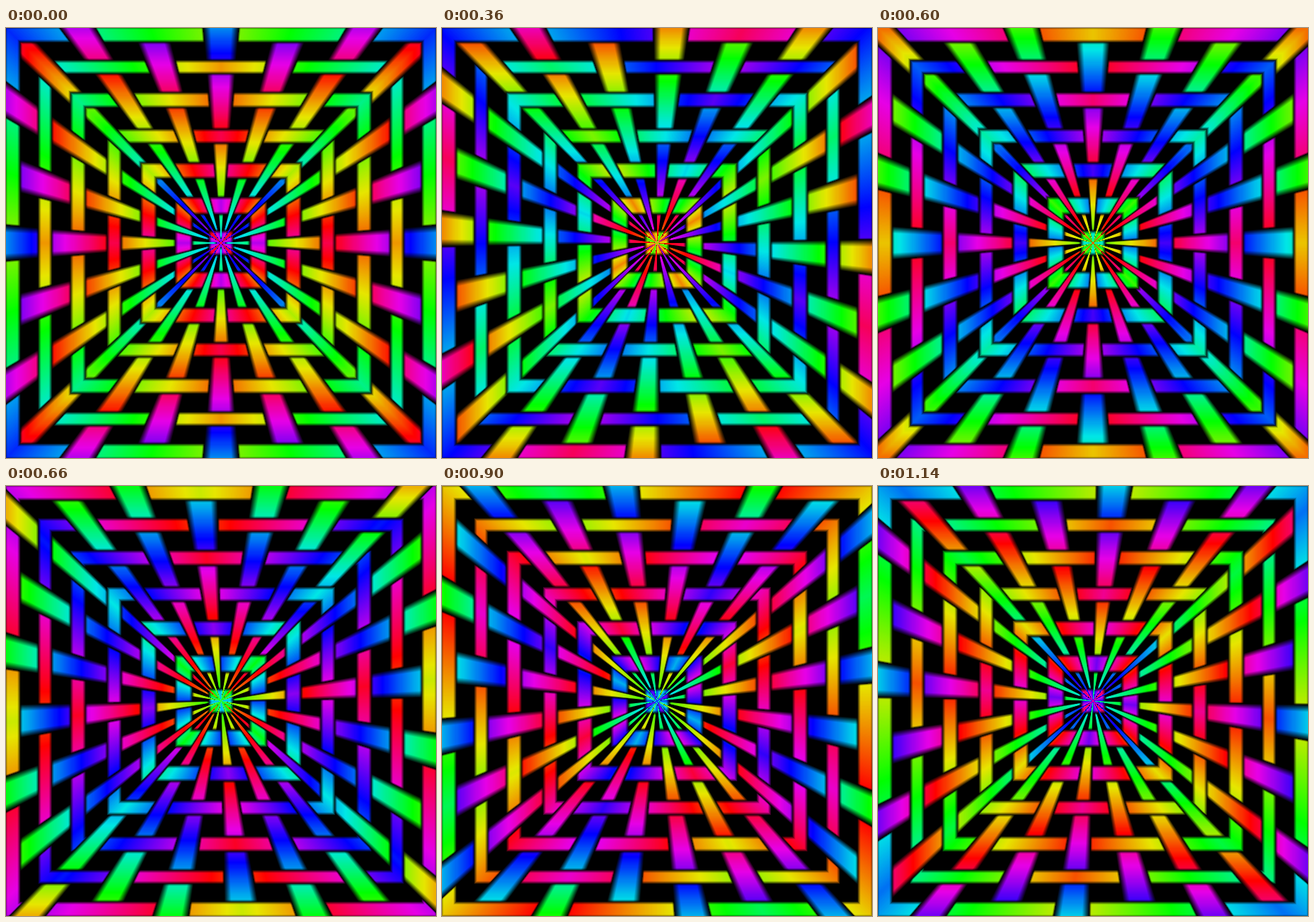
An HTML page with a canvas that plays this animation: 600x600 px, repeating every 1200 ms.

```html
<!DOCTYPE html>
<html lang="en">
<head>
<meta charset="utf-8">
<title>Woven rainbow tunnel</title>
<style>
html, body { margin: 0; width: 100%; height: 100%; overflow: hidden; background: #000; }
canvas { display: block; width: 600px; height: 600px; }
</style>
</head>
<body>
<canvas id="stage" width="600" height="600"></canvas>
<script>
const STEP_MS = 60, STEPS = 20, HALF = 300;
const TURN = 6 / STEPS;          // spokes travelled per step, 6 spokes per side
const HUE_STEP = 360 / STEPS;
const SPOKE = 0.25;              // half width of a spoke, in spoke spacings
const OUTER = [302, 255, 210, 159, 112, 64, 17];
const INNER = [280, 236, 189, 139, 90, 40, -9];
const MIDDLE = [290, 241, 197, 149, 102, 58, 20];
const LAST = OUTER.length - 1;

const ctx = document.getElementById('stage').getContext('2d');
const tile = document.createElement('canvas');
tile.width = tile.height = HALF;
const tileCtx = tile.getContext('2d');
const image = tileCtx.createImageData(HALF, HALF);
const pixels = image.data;

const clamp = v => Math.min(1, Math.max(0, v));

// distance from the nearest side middle, 0 to 3
const fold = w => Math.abs(w - 6 * Math.round(w / 6));

// pure hues, slightly darker where two channels mix
const palette = Array.from({ length: 360 }, (_, h) => {
  const s = h / 60;
  const rgb = [Math.abs(s - 3) - 1, 2 - Math.abs(s - 2), 2 - Math.abs(s - 4)].map(clamp);
  const mixed = rgb[0] + rgb[1] + rgb[2] - 1;
  return rgb.map(v => v * (255 - 25 * mixed));
});

function paint(at, hue, light) {
  const rgb = palette[Math.floor(((hue % 360) + 360) % 360)];
  for (let c = 0; c < 3; c++) pixels[at + c] = rgb[c] * light;
}

function paintSpoke(at, r, k, offset, band, shift) {
  const side = clamp((1 - Math.abs(offset) / SPOKE) / 0.42);
  const far = band > 0 ? INNER[band - 1] - r : 9;
  const near = band < LAST ? r - OUTER[band + 1] : 9;
  const end = clamp((Math.min(far, near) + 1) / 4);
  const hue = 216 + 40 * fold(k) + 52 * band + 0.95 * (MIDDLE[band] - r);
  paint(at, hue + shift, side * end);
}

function paintRing(at, r, w, band, shift) {
  const odd = (band + 1) & 1;
  const k = 2 * Math.round((w - odd) / 2) + odd;
  const edge = clamp((Math.min(OUTER[band] - r, r - INNER[band]) + 0.5) / 4.5);
  const gap = (1 - SPOKE - Math.abs(w - k)) * r / 3;
  const end = band < LAST ? clamp((gap + 0.5) / 3) : 1;
  const hue = 66 + (55 - 3.5 * band) * fold(k) - 28 * band + 40 * (fold(w) - fold(k));
  paint(at, hue + shift, edge * end);
}

function drawTile(step) {
  const shift = step * HUE_STEP;
  for (let py = 0, at = 0; py < HALF; py++) {
    for (let px = 0; px < HALF; px++, at += 4) {
      const x = px + 0.5 - HALF, y = py + 0.5 - HALF;
      const r = Math.max(-x, -y);
      const u = -y >= -x ? 3 * x / r : -6 - 3 * y / r;
      const w = u + TURN * step;
      const k = Math.round(w), offset = w - k;

      let band = 0;
      while (band < LAST && r < OUTER[band + 1]) band++;
      const onRing = r >= INNER[band];
      const onSpoke = Math.abs(offset) < SPOKE;
      const over = ((k + band) & 1) === 0;

      pixels[at + 3] = 255;
      if (onSpoke && (over || !onRing)) {
        paintSpoke(at, r, k, offset, over ? band : band + 1, shift);
      } else if (onRing) {
        paintRing(at, r, w, band, shift);
      } else {
        pixels[at] = pixels[at + 1] = pixels[at + 2] = 0;
      }
    }
  }
  tileCtx.putImageData(image, 0, 0);
}

function drawStage(step) {
  drawTile(step);
  ctx.imageSmoothingEnabled = false;
  // the weave repeats every quarter turn
  const quarters = [[1, 0], [0, 1], [-1, 0], [0, -1]];
  for (const [c, s] of quarters) {
    ctx.setTransform(c, s, -s, c, HALF, HALF);
    ctx.drawImage(tile, -HALF, -HALF);
  }
}

let shown = -1;
function tick() {
  const step = Math.floor(performance.now() / STEP_MS) % STEPS;
  if (step !== shown) drawStage(shown = step);
  requestAnimationFrame(tick);
}
tick();
</script>
</body>
</html>
```
